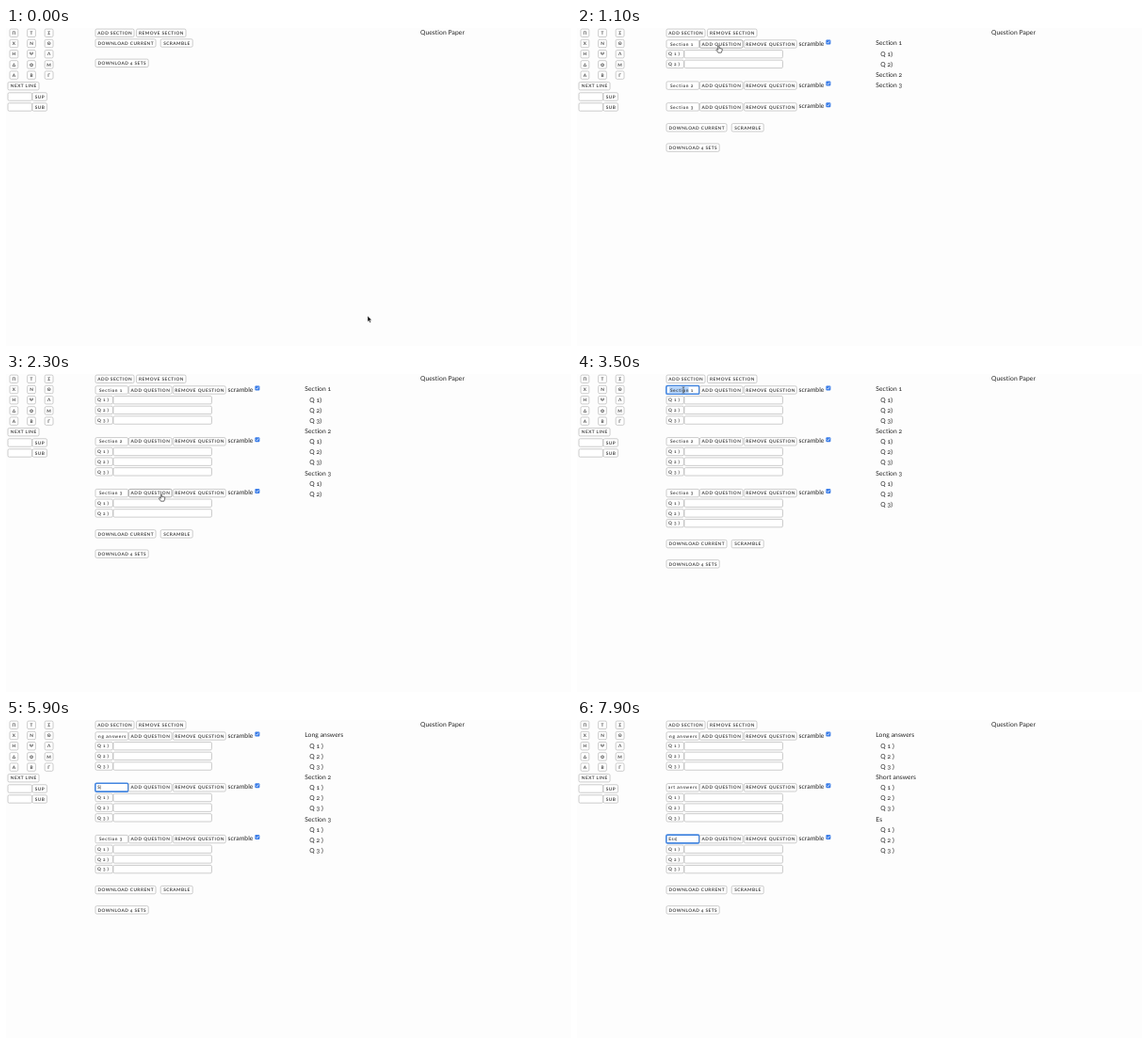
Recreate the animation shown at these times as an HTML page. Size 600 px wide and 338 px high, loop 8000 ms.

```html
<!DOCTYPE html>
<html lang="en">
<head>
<meta charset="utf-8">
<title>Question Paper</title>
<style>
  html, body { margin: 0; width: 100%; height: 100%; overflow: hidden; background: #fdfdfd; }
  svg { display: block; width: 100%; height: 100%; }
  text {
    font-family: Lato, "Open Sans", sans-serif; white-space: pre;
    font-variant-numeric: oldstyle-nums; text-rendering: geometricPrecision;
  }
  .page { font-size: 6.75px; letter-spacing: .06px; fill: #222; }
  .label { font-size: 4.75px; font-weight: 700; letter-spacing: .46px; fill: #444; }
  .value { font-size: 4.75px; font-weight: 700; letter-spacing: .62px; fill: #444; }
  .caret { font-weight: 400; fill: #222; }
  .box { fill: #fff; stroke: #b2b2b2; stroke-width: .65; }
  .hover { stroke: #808080; }
  .focus { fill: #fff; stroke: #4486e0; stroke-width: 1.6; }
</style>
</head>
<body>
<svg id="stage" viewBox="0 0 600 338" preserveAspectRatio="none"></svg>
<script>
const stage = document.getElementById('stage');
const LOOP = 8000, STEP = 100;

// Times below count steps of 100 ms.
const sectionTimes = [4, 5, 7];
const questionTimes = [[10, 11, 12], [15, 16, 17], [20, 21, 24]];
const focusTimes = [28, 53, 72];
const selectTimes = [[29, 40], [55, 59], [74, 77]];
const names = ['Long answers', 'Short answers', 'Essay'];
const typingStart = [40, 59, 77];
const typedCount = [
  s => 1 + Math.floor((s - 40) * 1.35),
  s => s < 65 ? Math.min(s - 58, 5) : 5 + Math.ceil((s - 64) * 1.6),
  s => s - 76
];
const pointerPath = [
  [0, 384, 306], [2, 118, 5], [7, 118, 5], [9, 150, 19], [13, 151, 19],
  [15, 156, 70], [17, 156, 70], [20, 165, 128], [24, 165, 128],
  [28, 110, 17], [31, 107, 17], [33, 263, 64], [34, 263, 64], [35, 113, 17],
  [50, 113, 17], [53, 105, 73], [56, 105, 73], [57, 96, 117], [58, 82, 117],
  [70, 88, 110], [72, 107, 128], [80, 107, 128]
];
const pointerHidden = [[40, 50], [59, 70], [77, 80]];

const within = (s, [from, to]) => s >= from && s < to;
const sectionName = (i, s) => s < typingStart[i]
  ? `Section ${i + 1}` : names[i].slice(0, typedCount[i](s));

function pointerAt(s) {
  const k = Math.max(1, pointerPath.findIndex(p => p[0] >= s));
  const [t0, x0, y0] = pointerPath[k - 1], [t1, x1, y1] = pointerPath[k];
  const p = (s - t0) / (t1 - t0);
  return { x: x0 + (x1 - x0) * p, y: y0 + (y1 - y0) * p, shape: 'arrow' };
}

const text = (x, y, str, cls, anchor = 'start') =>
  `<text x="${x}" y="${y}" class="${cls}" text-anchor="${anchor}">${str}</text>`;
const pageText = (x, cy, str) => text(x, cy + 2.2, str, 'page');
const box = (x, cy, w, cls = 'box', h = 8.4) =>
  `<rect x="${x}" y="${cy - h / 2}" width="${w}" height="${h}" rx="1.4" class="${cls}"/>`;
const covers = (x, cy, w, p) => p.x >= x && p.x <= x + w && Math.abs(p.y - cy) < 4.5;

function button(x, cy, w, str, pointer) {
  const hover = covers(x, cy, w, pointer);
  if (hover) pointer.shape = 'hand';
  return box(x, cy, w, hover ? 'box hover' : 'box') +
    text(x + w / 2 + .25, cy + 1.7, str, 'label', 'middle');
}

function sidebar(pointer) {
  let out = '';
  ['ΠΤΣ', 'ΧΝΘ', 'ΗΨΛ', 'ΔΦΜ', 'ΑΒΓ'].forEach((row, r) =>
    [...row].forEach((letter, c) => {
      out += button(4 + c * 18.6, 5.3 + r * 11.2, 8.8, letter, pointer);
    }));
  out += button(2, 61.7, 33, 'NEXT LINE', pointer);
  ['SUP', 'SUB'].forEach((str, i) => {
    const y = 73 + i * 11;
    out += box(2, y, 25.6) + button(28, y, 15.5, str, pointer);
  });
  return out;
}

const checkbox = cy =>
  `<rect x="264.4" y="${cy - 4.6}" width="5" height="5" rx="1" fill="#3b7de8"/>
   <path d="M265.6 ${cy - 2}l1 1.1 1.7-2.4" fill="none" stroke="#fff" stroke-width=".7"/>`;

function nameInput(i, cy, s, pointer) {
  const focused = s >= focusTimes[i] && !(s >= focusTimes[i + 1]);
  const typed = s >= typingStart[i];
  const name = sectionName(i, s);
  const overflow = name.length > 9;
  const caret = focused && typed ? '<tspan class="caret" dx="-.6">|</tspan>' : '';
  if (covers(95, cy, 34.6, pointer)) pointer.shape = 'beam';
  let out = focused ? box(94.8, cy - .1, 35, 'focus', 8.8) : box(95, cy, 34.6);
  if (within(s, selectTimes[i]))
    out += `<rect x="98" y="${cy - 3.2}" width="20.6" height="6.4" fill="#b3d4fc"/>`;
  const x = overflow ? 31 : typed ? .2 : 1.9;
  return out + `<svg x="97" y="${cy - 4}" width="31" height="8">` +
    text(x, 5.7, name + caret, 'value', overflow ? 'end' : 'start') + '</svg>';
}

function pointerShape({ x, y, shape }) {
  const paths = {
    arrow: '<path d="M0 0v6.3l1.4-1.3 1 2.3 1.1-.5-1-2.2h2z" fill="#111" stroke="#fff" stroke-width=".4"/>',
    hand: '<path d="M-.7 .3Q0-.6 .6 .3V2.6Q1.3 2 1.8 2.8 2.5 2.3 2.9 3.1 3.8 2.7 3.8 3.8L3.4 5.6 2.8 7.2H-.6L-2.5 4.4Q-2.5 3.3-1.5 3.7L-.7 4.4Z" fill="#fff" stroke="#222" stroke-width=".65"/>',
    beam: '<path d="M-1.3-3.3Q0-3.3 0-2.4 0-3.3 1.3-3.3M0-2.5V2.5M-1.3 3.3Q0 3.3 0 2.4 0 3.3 1.3 3.3" fill="none" stroke="#333" stroke-width=".6"/>'
  };
  return `<g transform="translate(${x} ${y})">${paths[shape]}</g>`;
}

function draw(s) {
  const pointer = pointerAt(s);
  const count = times => times.filter(t => s >= t).length;
  const sections = count(sectionTimes);
  const spacedNumbers = s > typingStart[0];
  let out = sidebar(pointer) +
    button(95, 5.3, 41, 'ADD SECTION', pointer) +
    button(138.5, 5.3, 52.5, 'REMOVE SECTION', pointer) +
    pageText(440, 5, 'Question Paper');
  let formY = 17, paperY = 16.2;

  for (let i = 0; i < sections; i++) {
    out += nameInput(i, formY, s, pointer) +
      button(130.4, formY, 45.6, 'ADD QUESTION', pointer) +
      button(177.4, formY, 55.8, 'REMOVE QUESTION', pointer) +
      pageText(235.6, formY - .7, 'scramble') + checkbox(formY) +
      pageText(317.3, paperY, sectionName(i, s - 1));
    const questions = count(questionTimes[i]);
    for (let q = 1; q <= questions; q++) {
      const y = formY + q * 10.68;
      out += box(95, y, 18.4) + text(97, y + 1.7, `Q ${q} )`, 'label') +
        box(114, y, 104.5) +
        pageText(322.2, paperY + q * 11.1, `Q ${q}${spacedNumbers ? ' ' : ''})`);
    }
    formY += 22.75 + questions * 10.68;
    paperY += 11.4 + questions * 11.1;
  }

  const footerY = sections ? formY - .8 : 16;
  out += button(95, footerY, 64, 'DOWNLOAD CURRENT', pointer) +
    button(164.2, footerY, 34, 'SCRAMBLE', pointer) +
    button(95, footerY + 21.3, 56.2, 'DOWNLOAD 4 SETS', pointer);

  if (!pointerHidden.some(span => within(s, span))) out += pointerShape(pointer);
  stage.innerHTML = out;
}

const start = performance.now();
let shown = -1;
function tick() {
  const s = Math.floor((performance.now() - start) % LOOP / STEP);
  if (s !== shown) draw(shown = s);
  requestAnimationFrame(tick);
}
tick();
</script>
</body>
</html>
```
